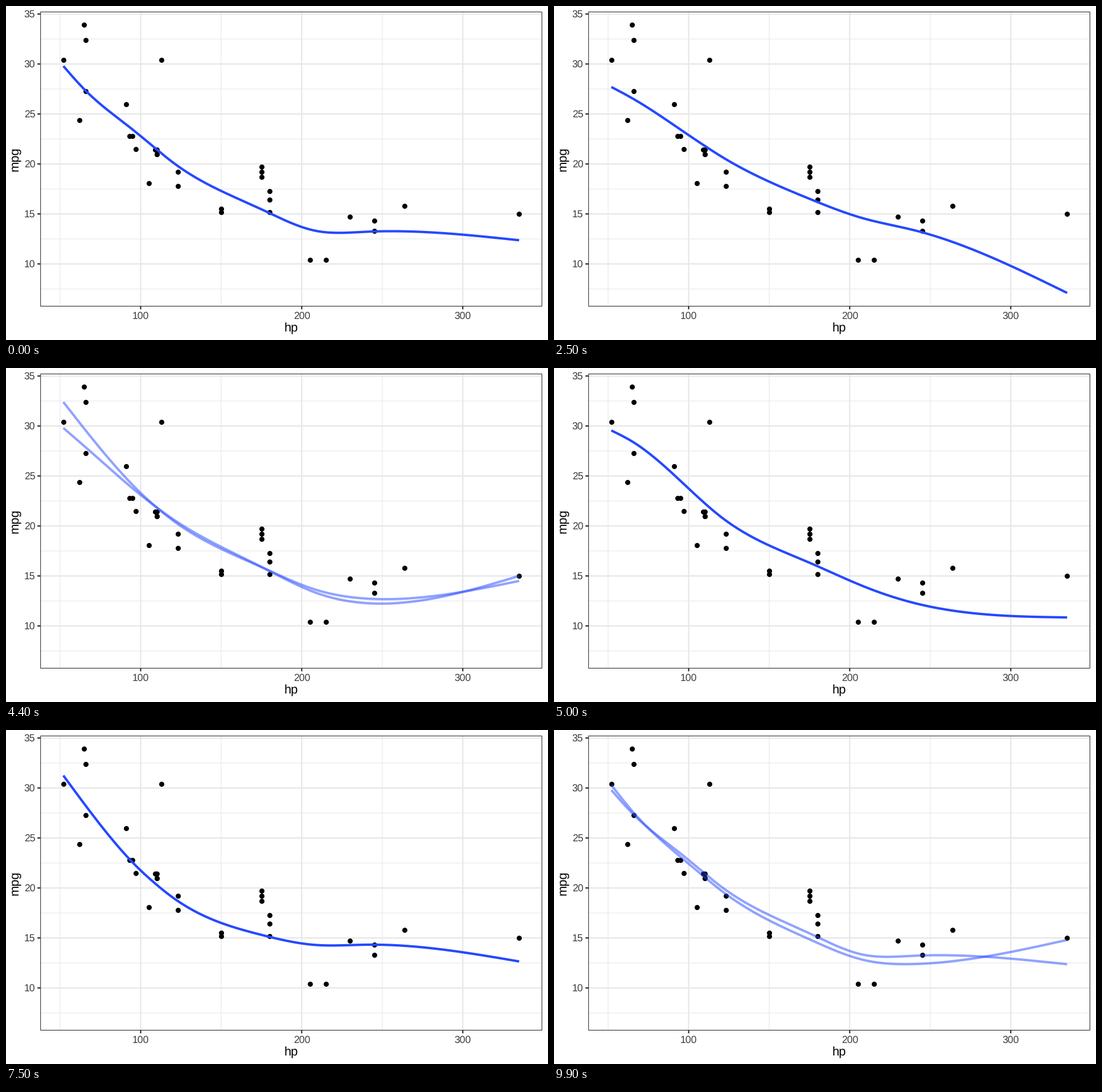
A matplotlib script for the animation above (10000 ms loop, 952 px wide and 588 px high).

```python
import numpy as np
import matplotlib.pyplot as plt
from matplotlib.animation import FuncAnimation
from matplotlib.patches import Rectangle

W, H, DPI = 952, 588, 64
PT = 72 / DPI                       # points per pixel
LEFT, RIGHT, TOP, BOTTOM = 60.7, 941.3, 10.5, 528.5
BLUE, GRID, DARK, LABEL = "#2549ff", "#e6e6e6", "#262626", "#3c3c3c"
HOLD, STEP = 4, 5                   # frames held, frames per draw
NOISE = 3.1                         # residual spread of mpg

plt.rcParams["font.family"] = "Liberation Sans"
plt.rcParams["text.hinting"] = "none"
plt.rcParams["path.snap"] = False

# mtcars: miles per gallon grouped by horsepower
CARS = {52: [30.4], 62: [24.4], 65: [33.9], 66: [32.4, 27.3], 91: [26],
        93: [22.8], 95: [22.8], 97: [21.5], 105: [18.1], 109: [21.4],
        110: [21, 21, 21.4], 113: [30.4], 123: [19.2, 17.8],
        150: [15.5, 15.2], 175: [18.7, 19.2, 19.7], 180: [16.4, 17.3, 15.2],
        205: [10.4], 215: [10.4], 230: [14.7], 245: [14.3, 13.3],
        264: [15.8], 335: [15]}
hp, mpg = np.array([(x, y) for x, ys in CARS.items() for y in ys], float).T

# Key heights of each posterior draw; their count selects the hp positions
KEYS_AT = {2: (52, 335), 3: (52, 235, 335),
           8: (52, 66, 95, 123, 150, 205, 245, 335)}
DRAWS = [
    (29.8, 27.3, 23.45, 19.8, 17.3, 13.45, 13.25, 12.37),
    (30.35, 10.45),
    (28.4, 13.47, 15),
    (28.65, 27.15, 23.95, 21.3, 18.45, 15.58, 16.8, 17.18),
    (27.9, 14.85, 16.3),
    (27.7, 7.1),
    (31.26, 12.9, 14.2),
    (30.5, 28.2, 23.4, 20.3, 17.7, 13.15, 12.27, 16.65),
    (29.8, 12.35, 15),
    (32.4, 12.8, 14.5),
    (29.55, 28.35, 24.5, 20.55, 18.05, 14.2, 12.1, 10.85),
    (31.03, 12.05, 14.3),
    (28.2, 26.5, 23.8, 21.1, 19.45, 14.9, 13.15, 18.55),
    (29.33, 12.85, 15),
    (30, 9.97),
    (31.25, 28.2, 22.55, 18.7, 16.5, 14.35, 14.33, 12.65),
    (33.02, 13.6, 14.5),
    (30.69, 12.45, 14.5),
    (29.6, 13.2, 15),
    (30.3, 27.5, 23.1, 19.4, 16.75, 12.95, 12.42, 14.8),
]


def px(x):
    return 236.5 + (np.asarray(x) - 100) * 2.829


def py(y):
    return 14.1 + (35 - np.asarray(y)) * 17.6


# Cubic regression spline with knots at quantiles of hp
knots = np.quantile(np.unique(hp), np.linspace(0, 1, 10))
n = len(knots)
gap = np.diff(knots)
D = np.zeros((n - 2, n))
B = np.zeros((n - 2, n - 2))
for i in range(n - 2):
    D[i, i:i + 3] = 1 / gap[i], -1 / gap[i] - 1 / gap[i + 1], 1 / gap[i + 1]
    B[i, i] = (gap[i] + gap[i + 1]) / 3
    if i < n - 3:
        B[i, i + 1] = B[i + 1, i] = gap[i + 1] / 6
inner = np.linalg.solve(B, D)
bend = np.vstack([np.zeros(n), inner, np.zeros(n)])
S = D.T @ inner


def basis(x):
    """Matrix from knot heights to spline heights at x."""
    x = np.asarray(x, float)
    j = np.clip(np.searchsorted(knots, x, "right") - 1, 0, n - 2)
    h = gap[j][:, None]
    a = (knots[j + 1] - x)[:, None] / h
    b = 1 - a
    eye = np.eye(n)
    return (a * eye[j] + b * eye[j + 1]
            + (a**3 - a) * h**2 / 6 * bend[j]
            + (b**3 - b) * h**2 / 6 * bend[j + 1])


# Penalised fit with about four degrees of freedom
X = basis(hp)
XX = X.T @ X


def edf(lam):
    return np.trace(np.linalg.solve(XX + lam * S, XX))


lam = min(np.geomspace(1, 1e8, 161), key=lambda v: abs(edf(v) - 4.2))
cov = np.linalg.inv(XX + lam * S)
mean = cov @ X.T @ mpg
cov *= NOISE**2


def draw_through(keys):
    """Knot heights of the posterior curve that passes near the keys."""
    A = basis(KEYS_AT[len(keys)])
    inv = np.linalg.inv(A @ cov @ A.T + 0.04**2 * np.eye(len(keys)))
    return mean + cov @ A.T @ inv @ (np.array(keys) - A @ mean)


grid = np.linspace(52, 335, 160)
curves = [py(basis(grid) @ draw_through(keys)) for keys in DRAWS]

fig = plt.figure(figsize=(W / DPI, H / DPI), dpi=DPI, facecolor="white")
ax = fig.add_axes([0, 0, 1, 1])
ax.set(xlim=(0, W), ylim=(H, 0))
ax.axis("off")


def segment(x, y, width, color, z):
    ax.plot(x, y, color=color, lw=width * PT, solid_capstyle="butt", zorder=z)


def label(x, y, text, size, color, ha="center", angle=0):
    ax.text(x, y, text, fontsize=size * PT, color=color, ha=ha, va="baseline",
            rotation=angle, rotation_mode="anchor")


for x in (50, 150, 250):
    segment([px(x)] * 2, [TOP, BOTTOM], 1.07, GRID, 1)
for y in np.arange(7.5, 33, 5):
    segment([LEFT, RIGHT], [py(y)] * 2, 1.07, GRID, 1)
for x in (100, 200, 300):
    segment([px(x)] * 2, [TOP, BOTTOM], 2.13, GRID, 2)
    segment([px(x)] * 2, [BOTTOM, BOTTOM + 5.5], 2.13, DARK, 2)
    label(px(x), 550.5, str(x), 17.6, LABEL)
for y in range(10, 36, 5):
    segment([LEFT, RIGHT], [py(y)] * 2, 2.13, GRID, 2)
    segment([LEFT - 5.5, LEFT], [py(y)] * 2, 2.13, DARK, 2)
    label(51.3, py(y) + 6.2, str(y), 17.6, LABEL, ha="right")

ax.scatter(px(hp), py(mpg), s=(9 * PT)**2, color="black", linewidths=0,
           zorder=3)
ax.add_patch(Rectangle((LEFT, TOP), RIGHT - LEFT, BOTTOM - TOP, fill=False,
                       ec=DARK, lw=1.07 * PT, zorder=6))
label(501, 573, "hp", 22, "black")
label(22.3, 270, "mpg", 22, "black", angle=90)

now, after = (ax.plot(px(grid), curves[0], color=BLUE, lw=4.2 * PT, zorder=z,
                      solid_capstyle="butt", solid_joinstyle="round")[0]
              for z in (4, 5))


def update(i):
    k, phase = divmod(i, STEP)
    fading = phase >= HOLD
    now.set_ydata(curves[k])
    now.set_alpha(0.5 if fading else 1)
    after.set_ydata(curves[(k + 1) % len(curves)])
    after.set_alpha(0.5)
    after.set_visible(fading)
    return now, after


anim = FuncAnimation(fig, update, frames=len(curves) * STEP, interval=100,
                     init_func=lambda: update(0), repeat=True, repeat_delay=0)
plt.show()
```
